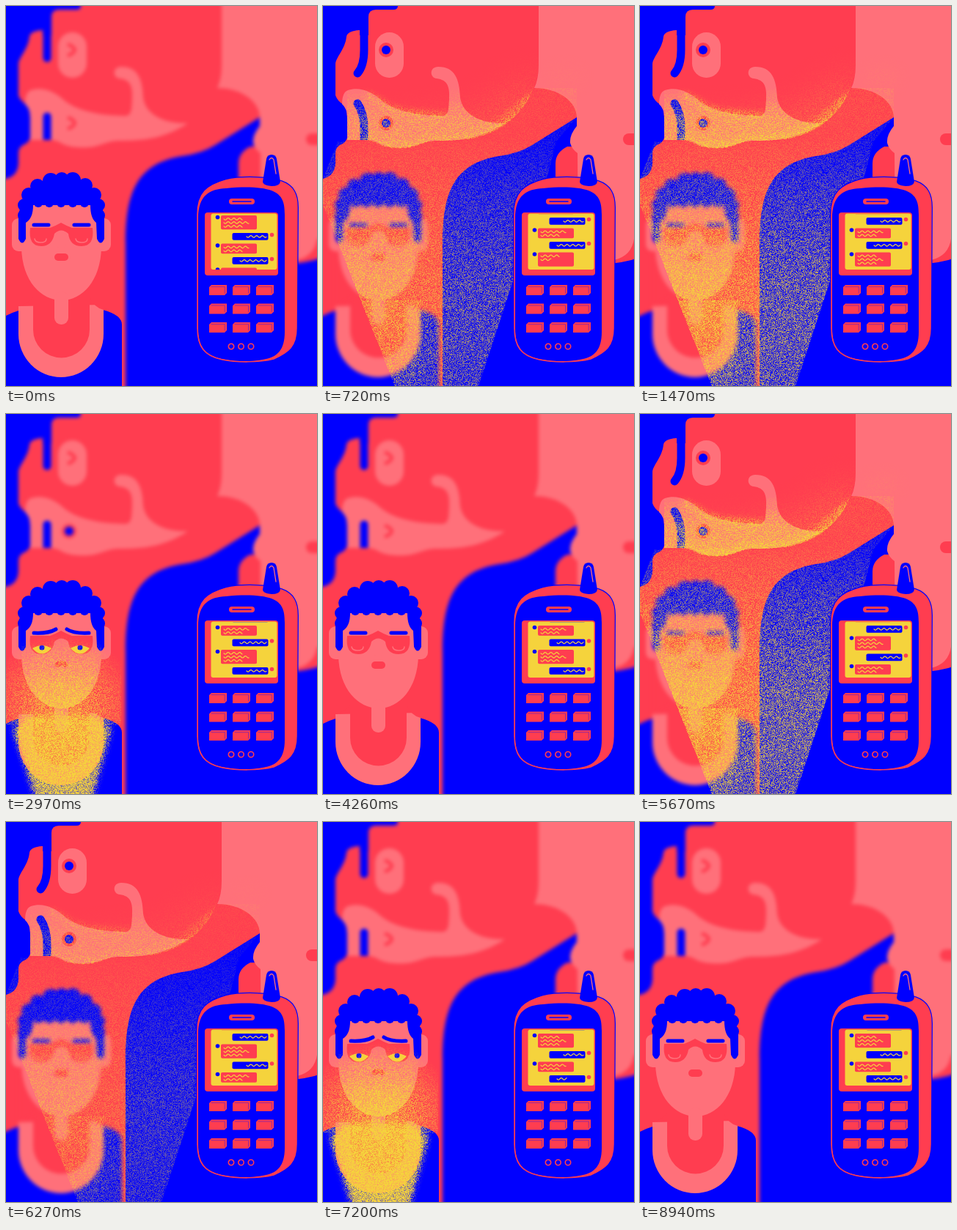
Recreate the animation shown at these times as an HTML page with a canvas. Size 424 by 519 pixels, loop 9030 ms.

```html
<!DOCTYPE html>
<html lang="en">
<head>
<meta charset="utf-8">
<title>Night messages</title>
<style>
html, body { margin: 0; width: 100%; height: 100%; overflow: hidden; background: #00f; }
canvas { display: block; width: 424px; height: 519px; }
</style>
</head>
<body>
<canvas id="stage" width="424" height="519"></canvas>
<script>
const W = 424, H = 519, LOOP = 9030, HALF = 4500, STEP = 30;
const PAD = 12; // margin around layers, so blur has no seam at the stage edge
const BLUE = '#0000ff', RED = '#ff3d50', PINK = '#ff707a', YELLOW = '#f5d33c';

const layer = () => {
  const c = document.createElement('canvas');
  c.width = W + 2 * PAD;
  c.height = H + 2 * PAD;
  const g = c.getContext('2d');
  g.translate(PAD, PAD);
  return g;
};
const main = document.getElementById('stage').getContext('2d');
const back = layer(), man = layer(), grain = layer();

const clamp = x => Math.max(0, Math.min(1, x));
const ease = (a, b, t) => { const x = clamp((t - a) / (b - a)); return x * x * (3 - 2 * x); };
const pulse = (a, b, c, d, t) => ease(a, b, t) * (1 - ease(c, d, t));

const fill = (g, color, d) => { g.fillStyle = color; g.fill(new Path2D(d)); };
const line = (g, color, width, d) => {
  g.strokeStyle = color;
  g.lineWidth = width;
  g.lineCap = g.lineJoin = 'round';
  g.stroke(new Path2D(d));
};
const box = (g, color, x, y, w, h, r) => {
  g.fillStyle = color;
  g.beginPath();
  g.roundRect(x, y, w, h, r);
  g.fill();
};
const dot = (g, color, x, y, r) => {
  g.fillStyle = color;
  g.beginPath();
  g.arc(x, y, r, 0, 7);
  g.fill();
};

// Outlines that are both painted and used to shape the light
const JAW = 'M62 184C75 186 78 193 98 194C130 196 132 184 155 184C185 184 210 183 235 170';
const RIM = JAW + 'C255 160 272 146 282 128';
const HEAD = JAW + 'C265 155 294 120 294 78L294 0L33 0L33 184Z';
const CHEEK = 'M33 183L64 183C75 185 78 192 98 193C130 195 132 184 155 184C185 184 215 182 248 160' +
  'C215 161 190 148 187 125C186 100 180 83 157 83C145 83 145 98 155 99C170 101 173 110 172 128' +
  'C171 140 172 148 164 150C140 150 105 147 82 131C66 116 50 110 34 115Q26 118 26 134Q33 140 33 152Z';
const FACE = 'M21 268L21 330C22 376 48 402 76 402C104 402 129 375 130 330L130 268Z';

function drawBack(open, lowEye) {
  const g = back;
  g.fillStyle = BLUE;
  g.fillRect(-PAD, -PAD, W + 2 * PAD, H + 2 * PAD);
  fill(g, RED, 'M102 0Q102 5 96 5L72 5Q62 5 62 15L62 40L50 40L50 33Q33 34 32 42C30 60 17 70 17 80' +
    'L17 122Q20 130 27 134Q33 140 33 152L33 180Q31 187 23 190Q17 193 17 202L17 215Q16 232 0 236' +
    'L-20 236L-20 540L163 540L163 325C163 255 178 215 240 205Q268 201 285 190L346 152L346 110L300 -20L102 -20Z');
  fill(g, RED, 'M349 192L333 192Q317 200 317 215L317 245L349 245Z');
  fill(g, RED, 'M370 353Q410 353 440 340L440 300L370 300Z');
  fill(g, PINK, 'M294 -20L294 80Q294 100 288 112C320 112 346 130 346 152L346 164Q336 176 337 187Q339 195 347 201' +
    'L348 347L397 347Q421 341 424 318L440 318L440 -20Z');
  box(g, RED, 409, 174, 40, 16, 8);
  fill(g, PINK, CHEEK);
  box(g, PINK, 71, 36, 39, 62, 19.5);

  // Brows
  g.save();
  g.beginPath();
  g.rect(0, 0, W, 183);
  g.clip();
  const bx = 56 - 9 * open;
  line(g, BLUE, 11, `M56 6L56 60Q56 ${66 + 16 * open} ${bx} ${71 + 21 * open}`);
  line(g, BLUE, 11, `M56 195L56 168Q56 ${158 - 12 * open} ${bx} ${151 - 18 * open}`);
  g.restore();

  [[60, open > .5], [160, open > .5 || lowEye]].forEach(([y, awake]) => {
    if (awake) {
      dot(g, RED, 86, y, 10);
      dot(g, BLUE, 86, y, 6);
    } else {
      line(g, RED, 5, `M86 ${y - 7}Q101 ${y} 86 ${y + 7}`);
    }
  });
}

function drawMan(open) {
  const g = man;
  g.clearRect(-PAD, -PAD, W + 2 * PAD, H + 2 * PAD);
  fill(g, BLUE, 'M-20 430L0 423Q10 418 20 415L132 415Q158 422 158 435L158 540L-20 540Z');
  fill(g, PINK, 'M17 410L17 448A58 59 0 0 0 133 448L133 408Z');
  fill(g, RED, 'M17 410Q30 407 37 397L114 397Q120 412 133 415L133 340L17 340Z');
  fill(g, RED, 'M37 400L37 442A38.5 38.5 0 0 0 114 442L114 400Z');
  box(g, PINK, 8, 290, 24, 45, 9);
  box(g, PINK, 119, 290, 24, 45, 9);
  fill(g, PINK, FACE);
  box(g, PINK, 66, 390, 19, 45, 9);

  // Hair
  fill(g, BLUE, 'M17 285L24 258L44 245L62 236L92 236L108 245L126 262L134 285L134 318Q129 329 124 318' +
    'L123 296Q115 290 115 272L37 272Q37 290 27 296L27 318Q22 329 17 318Z');
  [[31, 258, 10], [43, 246, 10], [61, 239, 11], [76, 237, 10], [91, 238, 11], [108, 245, 10], [120, 258, 10],
    [25, 272, 9], [126, 272, 9], [24, 286, 8], [127, 286, 8],
    [44, 269, 6], [59, 269, 6], [75, 269, 6], [91, 269, 6], [107, 269, 6]]
    .forEach(h => dot(g, BLUE, ...h));

  // Eyes, nose and mouth
  fill(g, RED, 'M33 303L60 303Q68 300 75 296Q82 300 90 303L118 303Q121 328 103 328Q87 328 85 311' +
    'Q75 302 66 311Q63 328 48 328Q30 328 33 303Z');
  box(g, PINK, 69, 307, 13, 24, 6);
  if (open > .5) {
    [49, 101].forEach(x => {
      fill(g, YELLOW, `M${x - 13} 320Q${x} 311 ${x + 13} 320Q${x} 335 ${x - 13} 320Z`);
      dot(g, BLUE, x, 319, 3.5);
      line(g, RED, 2, `M${x - 12} 318Q${x} 312 ${x + 12} 318`);
    });
    fill(g, RED, 'M66 344Q67 337 75 337Q84 337 85 344L80 346L76 343L71 346Z');
  } else {
    [47, 103].forEach(x => line(g, PINK, 1.5, `M${x - 8} 318Q${x - 7} 323 ${x} 323Q${x + 8} 323 ${x + 8} 318`));
    box(g, RED, 66, 338, 19, 10, 5);
  }
  const lift = 5 * open;
  line(g, BLUE, 5, `M38 299Q58 ${299 + open} ${58 + 10 * open} ${299 - lift}`);
  line(g, BLUE, 5, `M113 299Q92 ${299 + open} ${93 - 10 * open} ${299 - lift}`);
}

// Each light is a density map, painted as plain alpha
function density(paint) {
  const g = layer();
  paint(g);
  const a = g.getImageData(PAD, PAD, W, H).data;
  return Float32Array.from({ length: W * H }, (_, i) => a[i * 4 + 3] / 255);
}
function shade(g, y0, y1, ...stops) {
  const s = g.createLinearGradient(0, y0, 0, y1);
  stops.forEach((a, i) => s.addColorStop(i / (stops.length - 1), `rgba(0,0,0,${a})`));
  return s;
}
function soft(g, blur, alpha, width, d) {
  g.filter = `blur(${blur}px)`;
  line(g, `rgba(0,0,0,${alpha})`, width, d);
  g.filter = 'none';
}

const bigLight = density(g => {
  const cone = 'M98 519L0 272L0 236L20 185L318 185L305 235L212 519Z';
  fill(g, shade(g, 185, 519, .12, .26, .36, .45, .46, .42), cone);
  fill(g, 'rgba(0,0,0,.1)', 'M190 185L290 112L346 112L346 152L318 185Z');
  g.save();
  g.clip(new Path2D(cone));
  fill(g, shade(g, 280, 402, 0, .5), FACE);
  fill(g, shade(g, 402, 519, .4, .1), 'M20 402L133 402L133 519L20 519Z');
  g.restore();
  g.save();
  g.clip(new Path2D(HEAD));
  fill(g, shade(g, 110, 195, 0, .4, .45), CHEEK);
  soft(g, 28, .3, 40, RIM);
  soft(g, 6, .8, 10, RIM);
  soft(g, 4, .6, 7, 'M60 122Q72 126 88 138Q110 148 164 150');
  g.restore();
  soft(g, 12, .06, 24, 'M318 98L340 98');
});

const manLight = density(g => {
  g.save();
  g.beginPath();
  g.rect(0, 250, 158, H);
  g.clip();
  g.translate(77, 405);
  const halo = g.createRadialGradient(0, 0, 25, 0, 0, 105);
  halo.addColorStop(0, 'rgba(0,0,0,.55)');
  halo.addColorStop(1, 'rgba(0,0,0,0)');
  g.fillStyle = halo;
  g.fillRect(-80, -110, 160, 130);
  g.restore();
  fill(g, shade(g, 310, 402, 0, .2, .75), FACE);
  g.filter = 'blur(4px)';
  fill(g, 'rgba(0,0,0,.95)', 'M42 530L30 490L10 430L32 412L120 412L143 430L126 490L116 530Z');
  g.filter = 'none';
});

let seed = 7;
const random = () => (seed = (seed * 16807) % 2147483647) / 2147483647;
const noise = Float32Array.from({ length: W * H }, () => random() - .5);
const pixels = grain.createImageData(W, H);
const ink = new Uint32Array(pixels.data.buffer);

// A translucent yellow whose strength is roughened by the noise
function drawGrain(map, level) {
  for (let i = 0; i < ink.length; i++) {
    const d = map[i] * level;
    const alpha = clamp(d + noise[i] * .9 * Math.min(1, d * 3));
    ink[i] = alpha * 255 << 24 | 0x3cd3f5;
  }
  grain.putImageData(pixels, PAD, PAD);
  main.drawImage(grain.canvas, -PAD, -PAD);
}

// Chat: four kinds of message, repeating; each slide pushes the top one out
const PITCH = [24, 14.5, 18.5, 14.5];
const LINES = [[25, 34, 25], [27], [34, 25], [36]];
const SLIDE = [[-120, 430], [1900, 2450], [4480, 5030], [6400, 6950]];

function wave(g, x, y, length) {
  g.strokeStyle = YELLOW;
  g.lineWidth = 1.2;
  g.beginPath();
  for (let i = 0; i <= length; i++) g.lineTo(x + i, y + 1.3 * Math.sin(i * .8));
  g.stroke();
}

function drawChat(g, t) {
  g.save();
  g.beginPath();
  g.rect(280, 284, 89, 76);
  g.clip();
  let y = 289 - SLIDE.reduce((sum, [a, b], i) => sum + PITCH[i] * ease(a, b, t), 0);
  for (let k = 0; k < 9; k++) {
    const kind = k % 4, lines = LINES[kind], mine = kind % 2;
    const start = k < 4 ? -1e4 : k < 8 ? SLIDE[k - 4][1] + 100 : 1e5;
    const typed = clamp((t - start) / 400) * lines.length;
    box(g, mine ? BLUE : RED, mine ? 308.5 : 293, y, 49, PITCH[kind] - 4.7, 2);
    dot(g, mine ? RED : BLUE, mine ? 362.5 : 288.5, y + 2.5, 2.8);
    lines.forEach((length, i) => {
      const part = clamp(typed - i);
      if (part) wave(g, mine ? 355 - length : 297, y + 4.8 + i * 5, length * part);
    });
    y += PITCH[kind];
  }
  g.restore();
}

function drawPhone(g, t) {
  const body = 'M261 285C261 255 275 245 300 238C320 233 360 234 375 240C392 246 397 258 397 275L396 440' +
    'C396 465 385 473 365 482C345 487 315 487 295 483C270 478 261 465 261 440Z';
  line(g, BLUE, 4, body);
  fill(g, RED, body);
  fill(g, BLUE, 'M262 290C262 258 278 250 300 249C330 246 350 248 362 252C377 258 380 268 380 285L380 445' +
    'C380 470 370 480 350 483C335 486 315 486 300 483C271 479 262 465 262 440Z');
  line(g, RED, 1.5, body);
  fill(g, BLUE, 'M350 240L355 209Q356 203 362 203Q368 203 369 209L374 240Q373 246 362 246Q350 245 350 240Z');
  line(g, PINK, 1.3, 'M359 210Q362 205 365 210L368 229');
  box(g, RED, 304, 263, 35, 8, 4);
  line(g, BLUE, 1.5, 'M309 267L334 267');
  box(g, RED, 271, 282, 100, 86, 4);
  box(g, YELLOW, 279.5, 283.5, 90, 76.5, 3);
  drawChat(g, t);
  for (let i = 0; i < 9; i++) {
    const x = 277 + i % 3 * 32, y = 381 + Math.floor(i / 3) * 25.5;
    fill(g, RED, `M${x} ${y + 3}L${x + 3} ${y}L${x + 24} ${y}L${x + 24} ${y + 11}L${x + 21} ${y + 14}L${x} ${y + 14}Z`);
    line(g, '#9c2796', 1, `M${x + 3} ${y + 2.5}L${x + 21.5} ${y + 2.5}L${x + 21.5} ${y + 11}`);
  }
  [307, 320.5, 334].forEach(x => line(g, RED, 1.6, `M${x - 3.7} 465a3.7 3.7 0 1 0 7.4 0a3.7 3.7 0 1 0 -7.4 0`));
}

function blurred(source, amount) {
  if (amount > .1) main.filter = `blur(${amount}px)`;
  main.drawImage(source.canvas, -PAD, -PAD);
  main.filter = 'none';
}

function render(t) {
  const p = t < HALF ? t : Math.min(t - HALF, HALF - 1);
  const focus = pulse(150, 600, 1850, 2300, p);
  const glow = pulse(350, 950, 1300, 2150, p);
  const manGlow = pulse(2150, 2600, 2800, 3700, p);

  drawBack(pulse(200, 500, 1850, 2150, p), t > 2850 && t < 3200);
  drawMan(pulse(2200, 2450, 3550, 3850, p));
  blurred(back, 2.6 * (1 - focus));
  blurred(man, 2.6 * focus);
  if (glow > 0) drawGrain(bigLight, glow);
  if (manGlow > 0) drawGrain(manLight, manGlow);
  drawPhone(main, t);
}

const begin = performance.now();
function tick() {
  const t = (performance.now() - begin) % LOOP;
  render(Math.floor(t / STEP) * STEP);
  requestAnimationFrame(tick);
}
tick();
</script>
</body>
</html>
```
